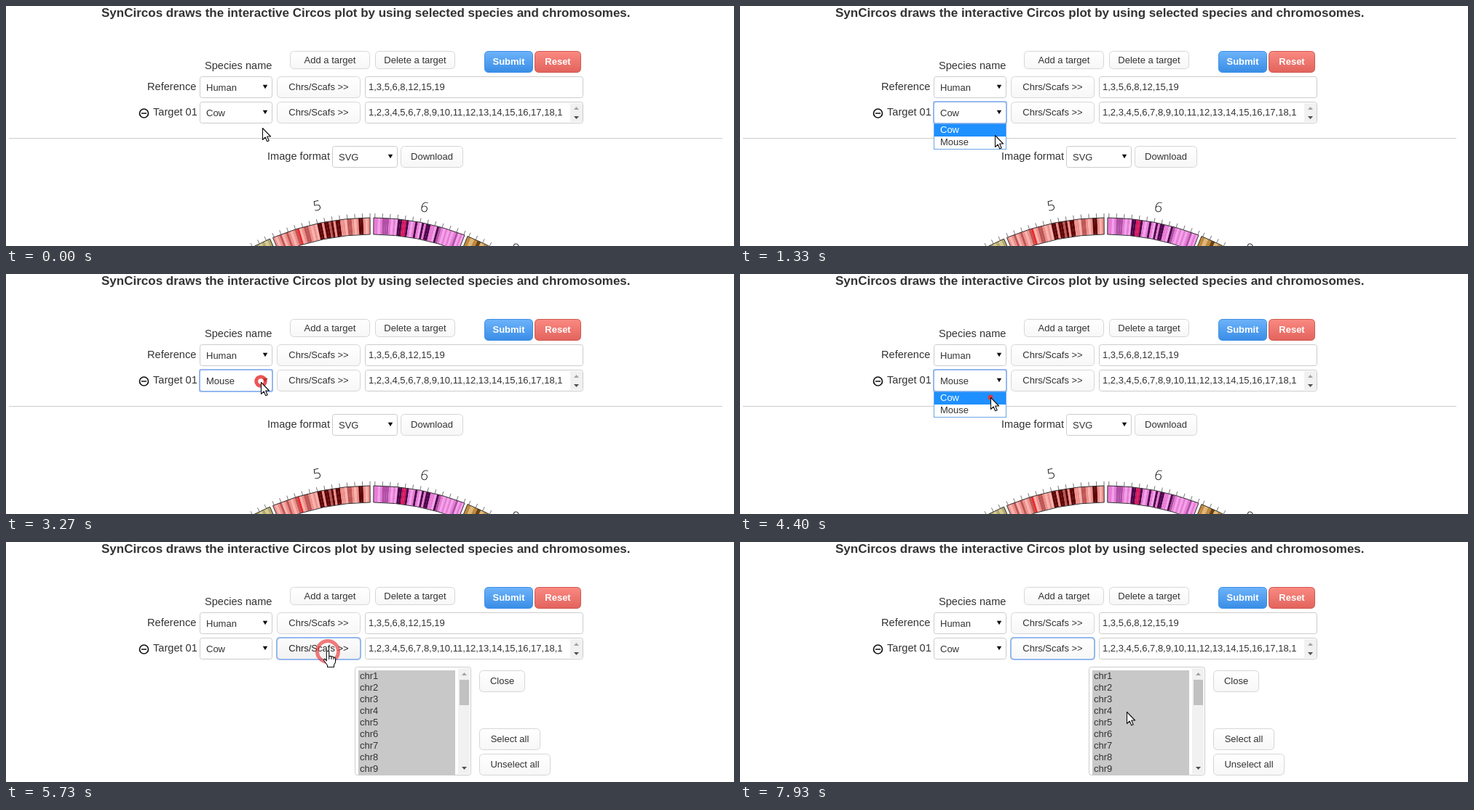
These frames come from a looping animation (1000x331 px, 8000 ms). An HTML page:

```html
<!DOCTYPE html>
<html lang="en">
<head>
<meta charset="utf-8">
<title>SynCircos</title>
<style>
html, body { margin: 0; width: 100%; height: 100%; overflow: hidden; background: #fff; }
svg { display: block; width: 1000px; height: 331px; font: 13px "Liberation Sans", Arial, sans-serif; fill: #333; }
.title { font-size: 17px; font-weight: bold; }
.label { font-size: 14.6px; }
.bold { font-weight: bold; fill: #fff; }
.chr { font: 300 19px "Open Sans", sans-serif; fill: #111; }
.mid { text-anchor: middle; }
.hover { fill: #222; }
.hover rect { fill: url(#pressed); }
.focus { fill: none; stroke: #95b8f0; stroke-width: 2; }
.cursor { fill: #fff; stroke: #111; stroke-width: 1.1; stroke-linejoin: round; }
</style>
</head>
<body>
<svg id="stage" viewBox="0 0 1000 331">
  <defs>
    <linearGradient id="plain" x2="0" y2="1"><stop stop-color="#fff"/><stop offset="1" stop-color="#f7f7f7"/></linearGradient>
    <linearGradient id="pressed" x2="0" y2="1"><stop stop-color="#fcfcfc"/><stop offset="1" stop-color="#f1f1f1"/></linearGradient>
    <linearGradient id="blue" x2="0" y2="1"><stop stop-color="#6db3fa"/><stop offset="1" stop-color="#398de6"/></linearGradient>
    <linearGradient id="red" x2="0" y2="1"><stop stop-color="#fa8a82"/><stop offset="1" stop-color="#e2635c"/></linearGradient>
  </defs>
</svg>
<script>
const LOOP = 8000, STEP = 1000 / 15;
const stage = document.getElementById('stage');

const text = (x, y, s, cls = '', extra = '') => `<text x="${x}" y="${y}" class="${cls}" ${extra}>${s}</text>`;
const rect = (x, y, w, h, fill, extra = '') => `<rect x="${x}" y="${y}" width="${w}" height="${h}" fill="${fill}" ${extra}/>`;
const group = (id, content) => `<g id="${id}">${content}</g>`;
const frame = (x, y, w, h, fill = '#fff', stroke = '#ccc', r = 3) =>
  rect(x + .5, y + .5, w - 1, h - 1, fill, `rx="${r}" stroke="${stroke}"`);
const button = (x, y, w, h, s) =>
  frame(x, y, w, h, 'url(#plain)', '#d6d6d6', 5) + text(x + w / 2, y + Math.round(h / 2 + 4), s, 'mid');
const accent = (x, w, s, fill, stroke) =>
  frame(x, 62, w, 30, `url(#${fill})`, stroke, 5) + text(x + w / 2, 81, s, 'mid bold');
const triangle = (x, y, w, h, fill) => `<path d="M${x - w / 2} ${y - h / 2}h${w}l${-w / 2} ${h}z" fill="${fill}"/>`;
const select = (x, y, w, s, id = '') =>
  frame(x, y, w, 30) + text(x + 9, y + 20, s, '', id && `id="${id}"`) + triangle(x + w - 10, y + 14.5, 6.5, 5.5, '#111');

// Circular plot: angles in degrees, clockwise from the top
const CX = 502.5, CY = 643, OUTER = 351, INNER = 328;
const polar = (a, r) => {
  const rad = a * Math.PI / 180;
  return `${(CX + r * Math.sin(rad)).toFixed(2)} ${(CY - r * Math.cos(rad)).toFixed(2)}`;
};
const sector = (a, b, fill, stroke = 'none') =>
  `<path d="M${polar(a, OUTER)}A${OUTER} ${OUTER} 0 0 1 ${polar(b, OUTER)}L${polar(b, INNER)}A${INNER} ${INNER} 0 0 0 ${polar(a, INNER)}z" fill="${fill}" stroke="${stroke}"/>`;
function chromosome(from, to, bands, colors) {
  const size = (to - from) / bands.length;
  let out = '';
  [...bands].forEach((c, i) => out += sector(from + i * size, from + (i + 1) * size + .03, colors[c]));
  for (let a = from + .3; a < to; a += 1.7)
    out += `<path d="M${polar(a, OUTER)}L${polar(a, OUTER + 6)}" stroke="#777"/>`;
  return out + sector(from, to, 'none', '#333');
}
const salmon = { a: '#ee8f8a', b: '#f8b3ae', m: '#bd5655', r: '#ee2a2a', d: '#5c0508' };
const violet = { a: '#e77bd6', b: '#f3a2e8', m: '#b04fa6', r: '#d8185f', d: '#4c0548' };
const olive = { a: '#b5a96c', b: '#d6cc96', d: '#5d552b' };
const tan = { a: '#c08a3e', b: '#e0b878', d: '#6b4312' };
const number = (x, y, turn, s) => text(x, y, s, 'chr mid', `transform="rotate(${turn} ${x} ${y - 7})"`);

const plot =
  chromosome(-40, -23.5, 'abdabbadabdabadbabdababa', olive) +
  chromosome(-22.8, -.4, 'abambamabamrbammababddaddmdaddaabmmabaddaba', salmon) +
  chromosome(.4, 21.3, 'aabammmababddrrdabadabdaddaabdmabababambab', violet) +
  chromosome(22, 40, 'abadbaabdabadbaabdbaab', tan) +
  number(427, 282, -12, 5) + number(575, 284, 12, 6) + number(699, 341, 31, 8);

const form =
  text(131, 15, 'SynCircos draws the interactive Circos plot by using selected species and chromosomes.', 'title') +
  text(273, 87, 'Species name', 'label') + text(194, 116, 'Reference', 'label') + text(202, 151, 'Target 01', 'label') +
  '<path d="M183.5 148a6 6 0 1 0 12 0a6 6 0 1 0 -12 0M186 148h7" fill="none" stroke="#111" stroke-width="1.7"/>' +
  button(390, 62, 110, 25, 'Add a target') + button(507, 62, 110, 25, 'Delete a target') +
  accent(657, 67, 'Submit', 'blue', '#3f8fe4') + accent(726, 64, 'Reset', 'red', '#cf5a53') +
  select(266, 97, 100, 'Human') + select(266, 132, 100, 'Cow', 'species') +
  button(372, 97, 115, 30, 'Chrs/Scafs &gt;&gt;') +
  group('scafs', button(372, 132, 115, 30, 'Chrs/Scafs &gt;&gt;')) +
  frame(493, 97, 300, 30) + text(498, 116, '1,3,5,6,8,12,15,19') +
  frame(493, 132, 300, 30) + text(498, 151, '1,2,3,4,5,6,7,8,9,10,11,12,13,14,15,16,17,18,1') +
  rect(775, 134, 17, 26, '#f1f1f1') + triangle(783.5, 141, 7, -4, '#a3a3a3') + triangle(783.5, 154, 7, 4, '#505050');

const result = rect(4, 182, 980, 1, '#ccc') + text(359, 212, 'Image format', 'label') +
  select(448, 193, 90, 'SVG') + button(542, 193, 86, 30, 'Download') + plot;

let picker = frame(479, 172, 160, 150) + rect(484, 177, 133, 144, '#c8c8c8') +
  rect(621, 174, 16, 146, '#f1f1f1') + rect(623, 190, 13, 35, '#c1c1c1') +
  triangle(629.5, 182, 7, -4, '#a3a3a3') + triangle(629.5, 312, 7, 4, '#505050') +
  button(650, 177, 63, 30, 'Close') + button(650, 257, 84, 30, 'Select all') + button(650, 292, 98, 30, 'Unselect all');
for (let i = 0; i < 9; i++) picker += text(486, 189 + 16 * i, 'chr' + (i + 1));

const menu = frame(266, 162, 100, 36, '#fff', '#6aa5e8', 0) + rect(267, 163, 98, 17, '#1e90ff', 'id="mark"') +
  text(275, 175, 'Cow', '', 'id="cow"') + text(275, 192, 'Mouse', '', 'id="mouse"');

stage.insertAdjacentHTML('beforeend', form + group('result', result) + group('picker', picker) +
  rect(266, 132, 100, 30, 'none', 'id="selectFocus" class="focus" rx="2"') +
  rect(372, 132, 115, 30, 'none', 'id="buttonFocus" class="focus" rx="4"') +
  group('menu', menu) + '<circle id="ripple" fill="none" stroke="#e93434"/>' +
  '<path id="arrow" class="cursor" d="M.5 .5V16.5L4.2 13L6.7 18.8L9.2 17.7L6.7 12H11.6z"/>' +
  '<path id="hand" class="cursor" d="M-1.7 1.5Q0 -1 1.7 1.5V8Q3.3 6.5 5 8.3Q7 7 8 9.3Q10.5 8.5 10.5 11.5V16L8.5 19.5V22.5H-.5V20L-5 14Q-6 11.5 -4 11.3L-1.7 13.8zM1.7 8V12M5 8.5V12M8 9.5V12"/>');

const $ = id => document.getElementById(id);
const set = (id, attrs) => { for (const k in attrs) $(id).setAttribute(k, attrs[k]); };
const show = (id, on) => { $(id).style.display = on ? '' : 'none'; };

// time, x, y of the pointer tip
const path = [[0, 352, 168], [340, 352, 168], [670, 350, 154], [1133, 350, 154], [1400, 350, 182], [2467, 350, 182],
  [3000, 350, 149], [3533, 350, 149], [3733, 344, 170], [4600, 344, 170], [5000, 437, 153], [5133, 437, 153],
  [5200, 442, 150], [6267, 442, 150], [6933, 531, 201], [7667, 531, 201], [7933, 531, 234], [LOOP, 531, 234]];
const clicks = [[795, 350, 154], [1790, 350, 182], [3201, 350, 148], [4375, 344, 170], [5590, 442, 151]];
const RIPPLE = 400;

function pointer(t) {
  const i = path.findIndex(k => k[0] > t);
  const [t0, x0, y0] = path[i - 1], [t1, x1, y1] = path[i];
  const p = (t - t0) / (t1 - t0), e = p * p * (3 - 2 * p);
  return [x0 + (x1 - x0) * e, y0 + (y1 - y0) * e];
}

function render(t) {
  const within = (a, b) => t >= a && t < b;
  const [x, y] = pointer(t).map(Math.round);
  const hover = x >= 372 && x < 487 && y >= 132 && y < 162;
  const onMouse = within(1390, 1860) || within(3330, 3700);

  show('arrow', !hover);
  show('hand', hover);
  set(hover ? 'hand' : 'arrow', { transform: `translate(${x} ${y})` });
  set('scafs', { class: hover ? 'hover' : '' });

  $('species').textContent = within(1860, 4460) ? 'Mouse' : 'Cow';
  show('menu', within(860, 1860) || within(3330, 4460));
  set('mark', { y: onMouse ? 180 : 163 });
  set('cow', { fill: onMouse ? '#333' : '#fff' });
  set('mouse', { fill: onMouse ? '#fff' : '#333' });
  show('selectFocus', within(860, 5660));
  show('buttonFocus', t >= 5660);
  show('result', t < 5730);
  show('picker', t >= 5730);

  const click = clicks.find(c => within(c[0], c[0] + RIPPLE));
  show('ripple', click);
  if (click) {
    const p = (t - click[0]) / RIPPLE, r = 29 * (1 - (1 - p) ** 2), w = Math.min(r, 5);
    set('ripple', { cx: click[1], cy: click[2], r: r - w / 2, 'stroke-width': w, opacity: 1 - p });
  }
}

function tick() {
  const now = performance.now() % LOOP;
  render(Math.min(Math.floor((now + 5) / STEP) * STEP, LOOP - 1));
  requestAnimationFrame(tick);
}
tick();
</script>
</body>
</html>
```
